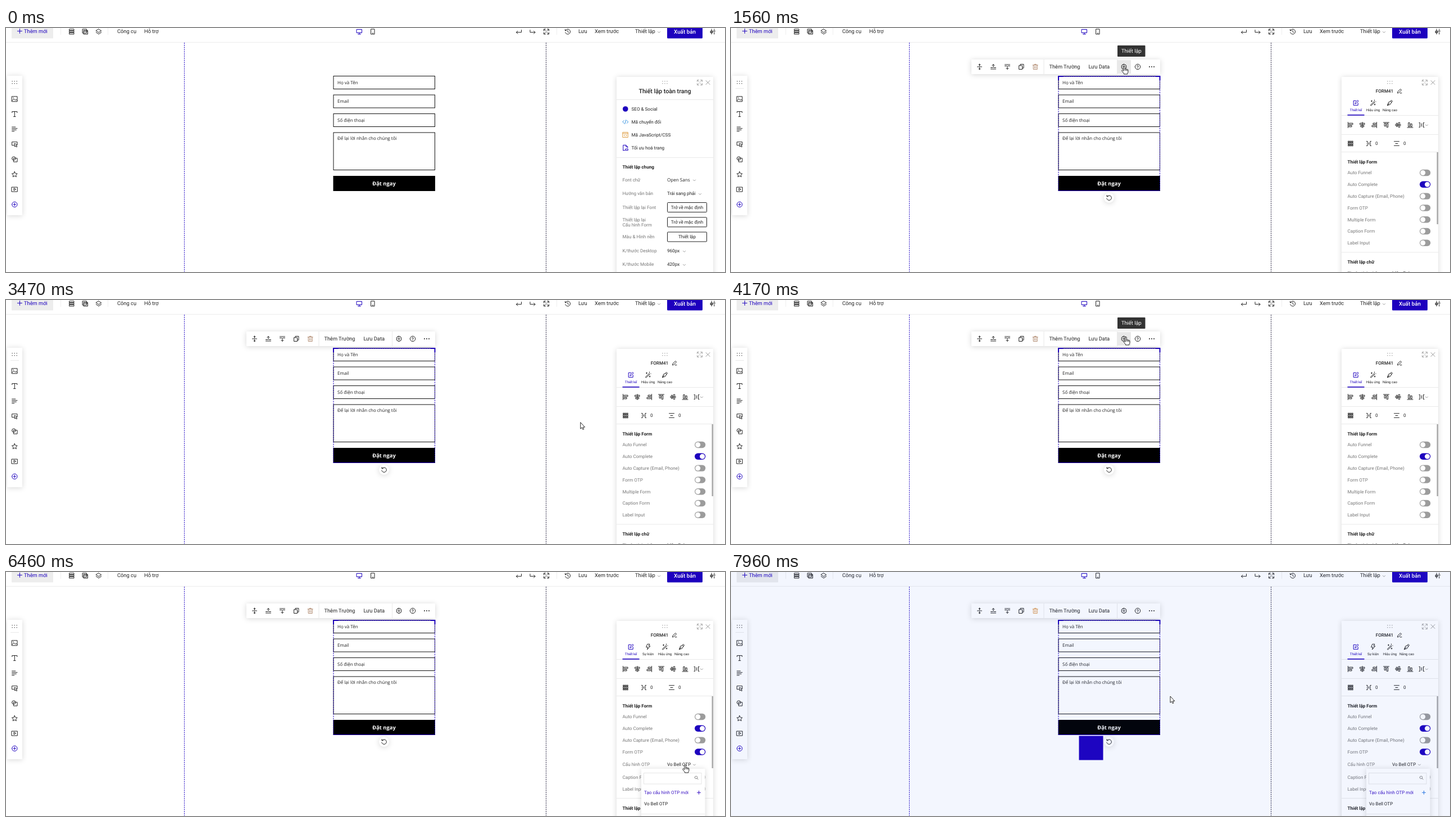
Recreate the animation shown at these times as an HTML page. Size 1280x434 px, loop 8000 ms.

```html
<!DOCTYPE html>
<html lang="vi">
<head>
<meta charset="utf-8">
<title>Form OTP</title>
<style>
html, body { margin: 0; width: 100%; height: 100%; overflow: hidden; background: #fff; }
svg { display: block; width: 1280px; height: 434px; }
text { font-family: Roboto, sans-serif; text-rendering: geometricPrecision; white-space: pre; }
.os { font-family: "Open Sans", sans-serif; }
.i { fill: none; stroke-width: 1; stroke-linejoin: round; stroke-linecap: round; }
.sh { filter: drop-shadow(0 1px 5px rgba(0, 0, 0, .16)); }
</style>
</head>
<body>
<svg id="stage" viewBox="0 0 1280 434" xmlns="http://www.w3.org/2000/svg"></svg>
<script>
const BLUE = '#1d00be', INK = '#222', GREY = '#777', LINE = '#e9e9e9';
const OTP_NAME = 'Vo Bell OTP';

// y is the middle of the capitals
const text = (x, y, s, { size = 8.1, fill = INK, w = 400, a = 'start', cls = '' } = {}) =>
  `<text x="${x}" y="${y + size * .355}" font-size="${size}" fill="${fill}" font-weight="${w}" text-anchor="${a}" class="${cls}">${s}</text>`;
const rect = (x, y, w, h, fill, extra = '') =>
  `<rect x="${x}" y="${y}" width="${w}" height="${h}" fill="${fill}" ${extra}/>`;
const box = (x, y, w, h, stroke, extra = '') => rect(x, y, w, h, 'none', `stroke="${stroke}" ${extra}`);
const icon = (x, y, d, stroke = INK, extra = '') =>
  `<path class="i" transform="translate(${x} ${y})" d="${d}" stroke="${stroke}" ${extra}/>`;
const hline = (x1, x2, y) => rect(x1, y, x2 - x1, 1, LINE);
const group = (id, body, extra = '') => `<g id="${id}" ${extra}>${body}</g>`;
const circle = r => `M${-r} 0a${r} ${r} 0 1 0 ${2 * r} 0a${r} ${r} 0 1 0 ${-2 * r} 0`;
const dots = (x, y, fill) => [0, 1, 2, 3, 4, 5].map(i =>
  rect(x - 4.8 + i % 3 * 4, y - 2.5 + (i > 2) * 4, 1.4, 1.4, fill)).join('');
const chevron = (x, y, c = '#999') => icon(x, y, 'M-2 -1L0 1 2 -1', c, 'stroke-width=".8"');

const ICON = {
  plus: 'M-4 0H4M0 -4V4',
  stack: 'M-4 -4.5H4V-2H-4ZM-4 -1.2H4V1.2H-4ZM-4 2H4V4.5H-4Z',
  windows: 'M-4.5 -4.5H2.5V2.5H-4.5ZM-2.5 -2.3H4.5V4.5H-2.5ZM-2.5 -.6H4.5',
  layers: 'M0 -4.5L4.7 -1.5 0 1.5 -4.7 -1.5ZM-4.7 1.2L0 4.4 4.7 1.2',
  monitor: 'M-4.5 -4H4.5V2H-4.5ZM0 2V4.3M-2.5 4.5H2.5',
  phone: 'M-3 -4.5H3V4.5H-3ZM-.8 2.8H.8',
  undo: 'M4.5 -3V1.2H-4.5M-2 -1.2L-4.5 1.2 -2 3.7',
  redo: 'M-4.5 -3V1.2H4.5M2 -1.2L4.5 1.2 2 3.7',
  full: 'M-4.5 -1.5V-4.5H-1.5M1.5 -4.5H4.5V-1.5M4.5 1.5V4.5H1.5M-1.5 4.5H-4.5V1.5M-4 -4L-1 -1M4 -4L1 -1M4 4L1 1M-4 4L-1 1',
  clock: 'M-4 -2A4.5 4.5 0 1 1 -4.3 1.4M-4.6 -4V-1.8H-2.4M0 -2.3V.3L1.8 1.3',
  sliders: 'M-2.3 -4.5V-1M-2.3 2V4.5M-4 .5H-.6M2.3 -4.5V-2.5M2.3 1V4.5M.6 -1H4M-4 -1.2H-.6V2H-4Z',
  image: 'M-4.7 -4.5H4.7V4.5H-4.7ZM-4.5 3L-1.3 -.3 1.2 2.2 2.8 .8 4.5 2.6M-2.6 -2.2h.8',
  type: 'M-4.5 -2.5V-4.5H4.5V-2.5M0 -4.5V4.5M-1.8 4.5H1.8',
  lines: 'M-4.7 -3.8H1.5M-4.7 -1.2H4.7M-4.7 1.3H3M-4.7 3.9H-.5',
  button: 'M-1 2H-4.7V-4H4.7V0M0 -1.2L5 1 2.8 1.9 4.5 4.4 3.2 5 1.8 2.8 .5 4.2Z',
  shapes: 'M-4.7 -1.5a3.2 3.2 0 1 0 6.4 0a3.2 3.2 0 1 0 -6.4 0M-1.5 -1.8H4.7V4.6H-1.5Z',
  star: 'M0 -4.8L1.5 -1.6 4.9 -1.2 2.4 1.1 3 4.5 0 2.8 -3 4.5 -2.4 1.1 -4.9 -1.2 -1.5 -1.6Z',
  video: 'M-5 -4H5V4H-5ZM-1.3 -2V2L2 0Z',
  add: circle(4.7) + 'M-2.3 0H2.3M0 -2.3V2.3',
  spread: 'M-4 0H4M0 -5V-1.5M-1.5 -3.3L0 -5 1.5 -3.3M0 5V1.5M-1.5 3.3L0 5 1.5 3.3',
  up: 'M-4.5 4H4.5M-4.5 1.5H-1.5M1.5 1.5H4.5M0 1.5V-4.3M-2 -2.3L0 -4.3 2 -2.3',
  down: 'M-4.5 -4H4.5M-4.5 -1.5H-1.5M1.5 -1.5H4.5M0 -1.5V4.3M-2 2.3L0 4.3 2 2.3',
  copy: 'M-4 -2.2H1.6V4.5H-4ZM-2 -2.2V-4.5H4V2.2H1.6',
  trash: 'M-4.5 -3H4.5M-1.5 -3V-4.5H1.5V-3M-3.5 -3V4.5H3.5V-3M-1.2 -.8V2.5M1.2 -.8V2.5',
  gear: 'M-1 -4.6H1L1.4 -3.2 3 -3.6 4.6 -1 3.7 0 4.6 1 3 3.6 1.4 3.2 1 4.6H-1L-1.4 3.2 -3 3.6 -4.6 1 -3.7 0 -4.6 -1 -3 -3.6 -1.4 -3.2Z' + circle(1.5),
  help: circle(4.7) + 'M-1.4 -1.2A1.4 1.4 0 1 1 0 .6V1M0 2.6V2.7',
  rotate: 'M-3.3 -2.6A4.3 4.3 0 1 1 -4.2 1M-4 -4.6V-2.2H-1.6',
  pencil: 'M-3.5 3.5L-3 1.2 1.8 -3.5 3.6 -1.7 -1.2 3ZM1 3.7H4',
  edit: 'M0 -3.6H-4.3V4.4H3.7V.5M-1.5 1.5L-1 -.6 3 -4.6 4.6 -3 .6 1Z',
  bolt: 'M-.8 -4.7H3L1 -1.2H3.8L-1.5 5 -.3 .8H-3Z',
  wand: 'M-4.5 4L1.8 -2.2 3 -1 -3.3 5ZM-2.5 -4V-2M-3.5 -3H-1.5M2.5 -5V-3.7M4.6 -2H5M3 2V4M2 3H4',
  pen: 'M-4.5 4.5L-2.3 -1 1.3 -2.8 3 -1 1 2.5ZM1.3 -2.8L2.7 -4.6 4.7 -2.6 3 -1M-4.5 4.5L-.7 .8',
  search: 'M-2.8 -.6a2.3 2.3 0 1 0 4.6 0a2.3 2.3 0 1 0 -4.6 0M1.2 1L3.2 3',
  alignH: 'M-4.5 -5V5M-2.5 -3.2H4V-.8H-2.5ZM-2.5 .9H2V3.3H-2.5Z',
  centerH: 'M0 -5V5M-4 -3.2H4V-.8H-4ZM-2.7 .9H2.7V3.3H-2.7Z',
  gap: 'M-4.5 -4H-3V4H-4.5M4.5 -4H3V4H4.5M0 -2.5V2.5',
};

const header = rect(0, 25, 1280, 1, '#ededed') + rect(10, -5, 74, 23.5, '#ededed', 'rx="1"') +
  icon(24.5, 5.5, ICON.plus, BLUE) + text(32, 6, 'Thêm mới', { size: 9.3, fill: BLUE }) +
  [97, 181, 980].map(x => rect(x, 0, 1, 12, '#eee')).join('') +
  [[117, 'stack'], [141, 'windows'], [165, 'layers'], [653, 'phone'], [913, 'undo'], [937.5, 'redo'],
   [962, 'full'], [1000, 'clock'], [1258.5, 'sliders']].map(([x, k]) => icon(x, 6.5, ICON[k])).join('') +
  icon(629, 6.5, ICON.monitor, BLUE) +
  [[198, 'Công cụ'], [246, 'Hỗ trợ'], [1019, 'Lưu'], [1048, 'Xem trước'], [1120, 'Thiết lập']]
    .map(([x, s]) => text(x, 6, s, { size: 9.3 })).join('') + chevron(1162.5, 7.5) +
  rect(1177, -5, 63, 23.5, BLUE, 'rx="1.5"') +
  text(1208.5, 6.5, 'Xuất bản', { size: 9.8, fill: '#fff', w: 500, a: 'middle' });

const sidebar = rect(2, 85, 27, 248, '#fff', 'class="sh" rx="1"') + dots(15.3, 96.5, '#666') + hline(8, 23, 107) +
  ['image', 'type', 'lines', 'button', 'shapes', 'star', 'video', 'add'].map((k, i) =>
    icon(15.3, 126.3 + i * 26.8, ICON[k], k == 'add' ? BLUE : INK)).join('');

const guide = (x, c) => `<path d="M${x} 26V434" stroke="${c}" stroke-dasharray="2.3 1.5"/>`;
const fields = [[85.5, 23, 'Họ và Tên'], [119, 23, 'Email'], [152.5, 23, 'Số điện thoại'], [186, 66.5, 'Để lại lời nhắn cho chúng tôi']];
const form = fields.map(([y, h, s]) => box(583, y, 180.5, h, '#111') +
  text(590, y + (h > 30 ? 10.5 : 11.5), s, { size: 8, cls: 'os' })).join('') +
  rect(582.5, 263, 181.5, 27, '#000') +
  text(673, 276.5, 'Đặt ngay', { size: 9.4, fill: '#fff', w: 700, a: 'middle', cls: 'os' });

const selection = box(583, 86, 180.5, 203.5, BLUE, 'stroke-dasharray="2.4 1.6"') +
  `<path d="M583 93V86H591M756 86H763.5V93" fill="none" stroke="${BLUE}" stroke-width="2"/>` +
  `<path d="M583 86H763.5M583 289.5H763.5" stroke="${BLUE}"/>` +
  '<circle cx="673" cy="302" r="9" fill="#fff" class="sh"/>' + icon(673, 302, ICON.rotate);

const toolbar = rect(428, 56, 336, 26, '#fff', 'class="sh" rx="1"') +
  group('gearBg', rect(688, 57, 24, 24, '#e9e9e9')) +
  [[442.5, 'spread'], [467, 'up'], [492, 'down'], [517, 'copy'], [699.5, 'gear'], [724, 'help']]
    .map(([x, k]) => icon(x, 69, ICON[k])).join('') +
  icon(541.7, 69, ICON.trash, '#b08a70', 'id="trash"') +
  rect(556.5, 56, 1, 26, LINE) + rect(687, 56, 1, 26, LINE) +
  text(566.5, 69, 'Thêm Trường', { size: 9.2 }) + text(636.5, 69, 'Lưu Data', { size: 9.4 }) +
  [745, 749, 753].map(x => `<circle cx="${x}" cy="69" r="1" fill="${INK}"/>`).join('');

const tip = rect(688, 31, 49.5, 20, '#333', 'rx="1"') +
  text(712.8, 41, 'Thiết lập', { size: 9.3, fill: '#fff', a: 'middle' });
const hover = box(583, 0, 180.5, 23, BLUE, 'id="hoverBox"') +
  group('hoverTag', rect(729, 0, 35, 9.5, BLUE) +
    text(746.5, 4.8, 'FORM_ITEM52', { size: 4.7, fill: '#fff', w: 700, a: 'middle' }));

const panelBase = rect(1087, 87, 172, 360, '#fff', 'class="sh" rx="1"') + dots(1173, 96.5, '#aaa') +
  icon(1235, 97, ICON.full, '#aaa', 'stroke-width=".8"') + icon(1249.5, 97, 'M-3.5 -3.5L3.5 3.5M3.5 -3.5L-3.5 3.5', '#999');

const outlined = (y, s) => box(1177.5, y - 8.5, 70, 17, '#222', 'rx="1"') + text(1212.5, y, s, { a: 'middle' });
const label = (y, s) => text(1097.5, y, s, { fill: GREY });
const choice = (y, s, end, cls) => text(1177, y, s, { cls }) + chevron(end, y + 1);
const globalPanel = text(1173, 112.5, 'Thiết lập toàn trang', { size: 10.7, w: 500, a: 'middle' }) +
  hline(1087, 1259, 127) + hline(1087, 1259, 230) +
  `<circle cx="1102.7" cy="144" r="4.8" fill="${BLUE}"/>` +
  icon(1102.7, 167, 'M-2.5 -2.5L-5 0 -2.5 2.5M2.5 -2.5L5 0 2.5 2.5M1 -3.5L-1 3.5', '#2f8fe0') +
  icon(1102.7, 190, 'M-4.5 -4.5H4.5V4.5H-4.5ZM-4.5 -2.3H4.5M-1 -.5L-2.5 1 -1 2.5M1 -.5L2.5 1 1 2.5', '#e0a048') +
  icon(1102.7, 213, 'M-4 4.7V-4.7H1L4 -1.7V0M1 -4.7V-1.7H4M-4 4.7H-1M.5 2H4.5V4.7H.5Z', BLUE) +
  ['SEO &amp; Social', 'Mã chuyển đổi', 'Mã JavaScript/CSS', 'Tối ưu hoá trang']
    .map((s, i) => text(1113.5, 144 + i * 22.9, s)).join('') +
  text(1097.5, 247.5, 'Thiết lập chung', { w: 700 }) +
  label(270, 'Font chữ') + choice(270, 'Open Sans', 1225.5, 'os') +
  label(294.5, 'Hướng văn bản') + choice(294.5, 'Trái sang phải', 1235.5) +
  label(319, 'Thiết lập lại Font') + outlined(319, 'Trở về mặc định') +
  label(341, 'Thiết lập lại') + label(350, 'Cấu hình Form') + outlined(345.3, 'Trở về mặc định') +
  label(371.5, 'Màu &amp; Hình nền') + outlined(371.5, 'Thiết lập') +
  label(396.5, 'K/thước Desktop') + choice(396.5, '960px', 1207.5) +
  label(420.5, 'K/thước Mobile') + choice(420.5, '420px', 1207.5);

const toggle = (y, on, id = '') => rect(1226, y - 5.7, 19.3, 11.4, on ? BLUE : '#9c9c9c', `rx="5.7" id="${id}"`) +
  `<circle cx="${on ? 1239.6 : 1231.7}" cy="${y}" r="4.5" fill="#fff" id="${id && id + 'Knob'}"/>`;
const row = (y, s, on, id) => label(y, s) + toggle(y, on, id);
const tab = (x, s, k, c = INK) => icon(x, 133, ICON[k], c) + text(x, 146, s, { size: 6.1, fill: c, a: 'middle' });
const lastRows = tailY => row(tailY, 'Caption Form') + row(tailY + 20.7, 'Label Input') +
  hline(1087, 1259, tailY + 37) + text(1097.5, tailY + 54.8, 'Thiết lập chữ', { w: 700 }) +
  label(tailY + 74.8, 'Thuộc tính chữ') + choice(tailY + 74.8, 'Mặc định', 1220);
const formPanel = text(1163.5, 112, 'FORM41', { w: 500, a: 'middle' }) + icon(1190, 112, ICON.pencil) +
  hline(1087, 1259, 155) + rect(1097.5, 154, 30, 1.6, BLUE) + tab(1112.5, 'Thiết kế', 'edit', BLUE) +
  group('tabs3', tab(1143, 'Hiệu ứng', 'wand') + tab(1173, 'Nâng cao', 'pen')) +
  group('tabs4', tab(1143, 'Sự kiện', 'bolt') + tab(1173, 'Hiệu ứng', 'wand') + tab(1203, 'Nâng cao', 'pen')) +
  icon(1103, 172.5, ICON.alignH) + icon(1124, 172.5, ICON.centerH) +
  [[1145, 'alignH', 180], [1166.5, 'alignH', 90], [1187.5, 'centerH', 90], [1209, 'alignH', -90]].map(([x, k, a]) =>
    `<g transform="rotate(${a} ${x} 172.5)">${icon(x, 172.5, ICON[k])}</g>`).join('') +
  icon(1229.5, 172.5, ICON.gap) + chevron(1238.5, 173) + hline(1087, 1259, 189) + hline(1087, 1259, 220) +
  [...Array(9).keys()].map(i => box(1098.7 + i % 3 * 3.2, 201.3 + (i / 3 | 0) * 3.2, 2, 2, INK)).join('') +
  icon(1135, 205.5, 'M-3.5 -4H-2V4H-3.5M4.5 -4H3V4H4.5M.5 -1.5V1.5') + text(1147, 205.5, '0') +
  icon(1185, 205.5, 'M-4.5 -3.7H4.5M-2 0H2M-4.5 3.7H4.5') + text(1197, 205.5, '0') +
  rect(1256.5, 221, 2.5, 128, '#aaa') +
  text(1097.5, 238, 'Thiết lập Form', { w: 700 }) +
  row(257.5, 'Auto Funnel') + row(278.3, 'Auto Complete', true) + row(299.1, 'Auto Capture (Email, Phone)') +
  row(320, 'Form OTP', false, 'otp') +
  group('plainRows', row(340.7, 'Multiple Form') + lastRows(361.5)) +
  group('otpRows', label(342, 'Cấu hình OTP') + choice(342, OTP_NAME, 1225.5) + lastRows(365));

const menu = rect(1131, 350, 113.5, 100, '#fff', 'class="sh"') + box(1135.5, 357.5, 102.5, 19.5, '#e6e6e6') +
  icon(1229, 366, ICON.search, '#888', 'stroke-width=".8"') + rect(1131, 382.5, 113.5, 19.5, '#ececec', 'id="menuHover"') +
  text(1136, 392.3, 'Tạo cấu hình OTP mới', { fill: '#3a14c4' }) + icon(1233.5, 392.3, 'M-3 0H3M0 -3V3', '#3a14c4', 'id="menuPlus"') +
  text(1136, 412.3, OTP_NAME) + hline(1131, 1244, 430);

const pointer = 'fill="#fff" stroke="#111" stroke-width=".9" stroke-linejoin="round"';
const cursor = group('press', '<circle cy="2" r="8" fill="#f2e530" opacity=".85"/>') +
  group('arrow', `<path d="M0 0V11.4L2.6 9.1 4.2 12.8 6 12 4.4 8.5H7.8Z" ${pointer}/>`) +
  group('hand', `<path d="M-1.2 7V.8A1.2 1.2 0 0 1 1.2 .8V5.2A1.1 1.1 0 0 1 3.3 5.4 1.1 1.1 0 0 1 5.2 6 1 1 0 0 1 6.9 6.9V9.5Q6.9 11.5 5.8 12.7V14H-.6V12.8L-4.2 8.4Q-4.7 7.2 -3.6 6.8 -2.6 6.7 -1.2 8.6ZM1.2 5.2V7.8M3.3 5.6V8M5.2 6.2V8.3" ${pointer}/>`);

stage.innerHTML = guide(317.5, '#2a12c6') + guide(961.5, '#34304c') + header + sidebar + form +
  group('logo', rect(619.5, 291.5, 43, 43, BLUE)) + group('selection', selection + toolbar) + group('hover', hover) +
  group('tip', tip) + panelBase + group('globalPanel', globalPanel) + group('formPanel', formPanel) +
  group('menu', menu) + rect(0, 0, 1280, 434, 'rgb(36,90,236)', 'id="veil" opacity=".055"') + group('cursor', cursor);

const $ = id => document.getElementById(id);
const show = (id, on) => { $(id).style.display = on ? '' : 'none'; };

// time, x, y of the pointer's hot spot
const path = [[40, 742, 440], [660, 700, 140], [860, 696, 132], [930, 696, 131], [1560, 700, 68], [1700, 702, 66],
  [1770, 703, 66], [2170, 1193, 323], [2520, 1243, 321], [2590, 1242, 321], [2800, 1238, 320], [3200, 1238, 320],
  [3820, 708, 68], [4030, 701, 65], [4170, 703, 66], [4720, 1215, 320], [4860, 1229, 319], [5060, 1233, 315],
  [5560, 1233, 315], [6060, 1211, 340], [6200, 1209, 343], [6740, 1209, 343], [7340, 1183, 390], [7480, 1183, 390],
  [7960, 782, 221], [8000, 780, 220]];
const presses = [[600, 740], [5200, 5340], [6230, 6380], [7250, 7450]];
const SELECT = 690, OTP = 5330, SWITCH = 5560, OPEN = 6340, LOAD = 7480;

function locate(t) {
  let i = path.findIndex(p => p[0] > t);
  if (i < 1) i = 1;
  const [t0, x0, y0] = path[i - 1], [t1, x1, y1] = path[i];
  const k = Math.max(0, (t - t0) / (t1 - t0)), e = k * k * (3 - 2 * k);
  return [x0 + (x1 - x0) * e, y0 + (y1 - y0) * e];
}

function draw(t) {
  const [x, y] = locate(t);
  const inside = (l, top, r, b) => x >= l && x <= r && y >= top && y <= b;
  const picked = t >= SELECT, otp = t >= OTP, loading = t >= LOAD, open = t >= OPEN;
  const onGear = picked && inside(688, 57, 712, 81);
  const onItem = open && !loading && inside(1131, 382, 1244, 402);
  const onSwitch = picked && !open && inside(1226, 314, 1246, 326);
  const onChoice = otp && !loading && inside(1176, 335, 1230, 350);

  show('globalPanel', !picked);
  show('formPanel', picked);
  show('selection', picked);
  show('gearBg', onGear);
  show('tip', onGear);
  const f = t < 1700 && fields.find(([top, h]) => inside(583, top, 764, top + h));
  show('hover', f);
  if (f) {
    $('hoverBox').setAttribute('y', f[0]);
    $('hoverBox').setAttribute('height', f[1]);
    $('hoverTag').setAttribute('transform', `translate(0 ${f[0]})`);
  }

  show('plainRows', !otp);
  show('otpRows', otp);
  show('tabs3', t < SWITCH);
  show('tabs4', t >= SWITCH);
  const k = Math.min(1, Math.max(0, (t - SWITCH) / 140));
  $('otp').setAttribute('fill', k > .3 ? BLUE : '#9c9c9c');
  $('otpKnob').setAttribute('cx', 1231.7 + 7.9 * k);

  show('menu', open);
  $('menu').setAttribute('opacity', Math.min(1, (t - OPEN + 60) / 180));
  show('menuHover', onItem);
  $('menuPlus').setAttribute('stroke', loading ? '#2a78e0' : '#3a14c4');
  show('logo', loading);
  show('veil', loading);
  $('trash').setAttribute('stroke', loading ? '#dc9a55' : '#b08a70');

  const hand = onGear || onItem || onSwitch || onChoice;
  show('hand', hand);
  show('arrow', !hand);
  show('press', presses.some(([a, b]) => t >= a && t < b));
  $('cursor').setAttribute('transform', `translate(${x.toFixed(2)} ${y.toFixed(2)})`);
}

const start = performance.now();
function tick() {
  draw((performance.now() - start) % 8000);
  requestAnimationFrame(tick);
}
draw(0);
requestAnimationFrame(tick);
</script>
</body>
</html>
```
